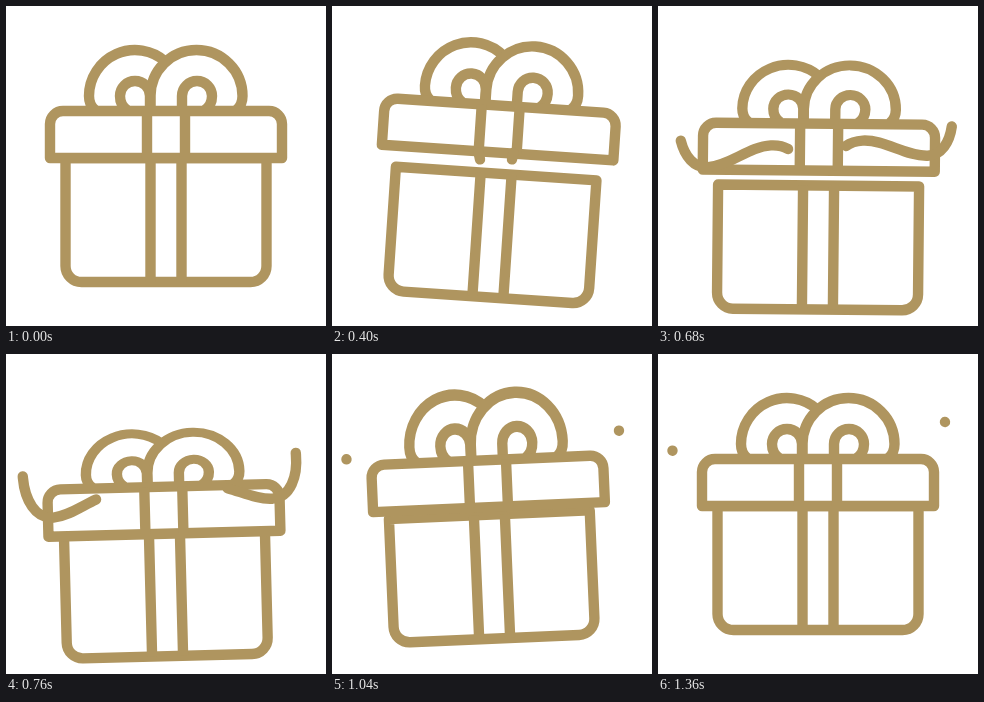
Animation, 320 px wide and 320 px high, one loop 1640 ms. Source, as an HTML page:

```html
<!DOCTYPE html>
<html lang="en">
<head>
<meta charset="utf-8">
<title>Gift box</title>
<style>
html, body { margin: 0; width: 100%; height: 100%; overflow: hidden; background: #fff; }
svg { display: block; width: 100vw; height: 100vh; }
</style>
</head>
<body>
<svg viewBox="0 0 320 320" fill="none" stroke="#af955f" stroke-width="10.4" stroke-linejoin="round">
  <g id="gift">
    <path d="M59.5 152H260.5V260A16 16 0 0 1 244.5 276H75.5A16 16 0 0 1 59.5 260Z"/>
    <path d="M144.5 152V276M175.5 152V276"/>
    <g id="lid">
      <g id="bow">
        <path d="M89 104Q83 99 83 90A46 46 0 0 1 159.75 55.8"/>
        <path d="M144.5 104V90A46 46 0 0 1 236.5 90Q236.5 99 230.5 104"/>
        <path d="M144 104V90A15 15 0 0 0 114 90Q114 99 121 104"/>
        <path d="M176 104V90A15 15 0 0 1 206 90Q206 99 199 104"/>
      </g>
      <path fill="#fff" d="M44 152V118A13 13 0 0 1 57 105H263A13 13 0 0 1 276 118V152Z"/>
      <path d="M141 105V152M179 105V152"/>
    </g>
  </g>
  <g id="curls" stroke-linecap="round">
    <path id="curlR"/>
    <path id="curlL" transform="scale(-1 1)"/>
  </g>
</svg>
<script>
const LOOP = 1640, STEP = 40, CURL_LEN = 172;
const CURL = 'M16 164C19 146 28 135.5 46 135.5C68 135.5 88 153.5 110 154C128 154 137 134 137 112V107';
const [gift, lid, bow, curls, curlR, curlL] =
  ['gift', 'lid', 'bow', 'curls', 'curlR', 'curlL'].map(id => document.getElementById(id));
const place = (el, transform) => el.setAttribute('transform', transform);
for (const c of [curlR, curlL]) c.setAttribute('d', CURL);

// Progress 0..1 between two times, and its eased forms
const part = (t, a, b) => Math.min(1, Math.max(0, (t - a) / (b - a)));
const ease = (t, a, b) => (1 - Math.cos(Math.PI * part(t, a, b))) / 2;
const easeIn = (t, a, b) => 1 - Math.cos(Math.PI / 2 * part(t, a, b));
const easeOut = (t, a, b) => Math.sin(Math.PI / 2 * part(t, a, b));

function drawBox(t, drop) {
  const tilt = 4 * ease(t, 100, 440) - 6.9 * ease(t, 480, 880) + 2.9 * ease(t, 940, 1340);
  // The lid pops off, lands, then bounces once
  const lift = 38 * ease(t, 240, 540) - 39.5 * ease(t, 580, 760)
    + 15.5 * ease(t, 760, 950) - 14 * ease(t, 950, 1140);
  const puff = 1 + 0.08 * ease(t, 360, 560) - 0.21 * ease(t, 580, 760)
    + 0.23 * ease(t, 760, 1000) - 0.1 * ease(t, 1040, 1200);
  place(gift, `translate(0 ${drop}) rotate(${tilt} 160 214)`);
  place(lid, `translate(0 ${-lift})`);
  place(bow, `translate(0 ${100 * (1 - puff)}) scale(1 ${puff})`);
}

// Two mirrored streamers run along one path
function drawCurls(t, drop) {
  const tip = CURL_LEN * easeOut(t, 390, 800);
  const tail = CURL_LEN * easeIn(t, 540, 920);
  const shown = tip > 0 && tail < CURL_LEN;
  curls.setAttribute('display', shown ? 'inline' : 'none');
  const sway = ease(t, 500, 860);
  place(curls, `translate(${164 - 11 * sway} ${drop - 26}) rotate(${-6 * sway} 0 130)`);
  for (const c of [curlR, curlL]) {
    c.setAttribute('stroke-dasharray', `${Math.max(0.1, tip - tail)} 999`);
    c.setAttribute('stroke-dashoffset', -tail);
  }
}

function draw(t) {
  const drop = 27.5 * (ease(t, 120, 640) - ease(t, 680, 1260));
  drawBox(t, drop);
  drawCurls(t, drop);
}

const start = performance.now();
function tick() {
  const t = (performance.now() - start) % LOOP;
  const held = Math.floor(t / STEP) * STEP;
  draw(held < 120 ? 0 : held);
  requestAnimationFrame(tick);
}
tick();
</script>
</body>
</html>
```
